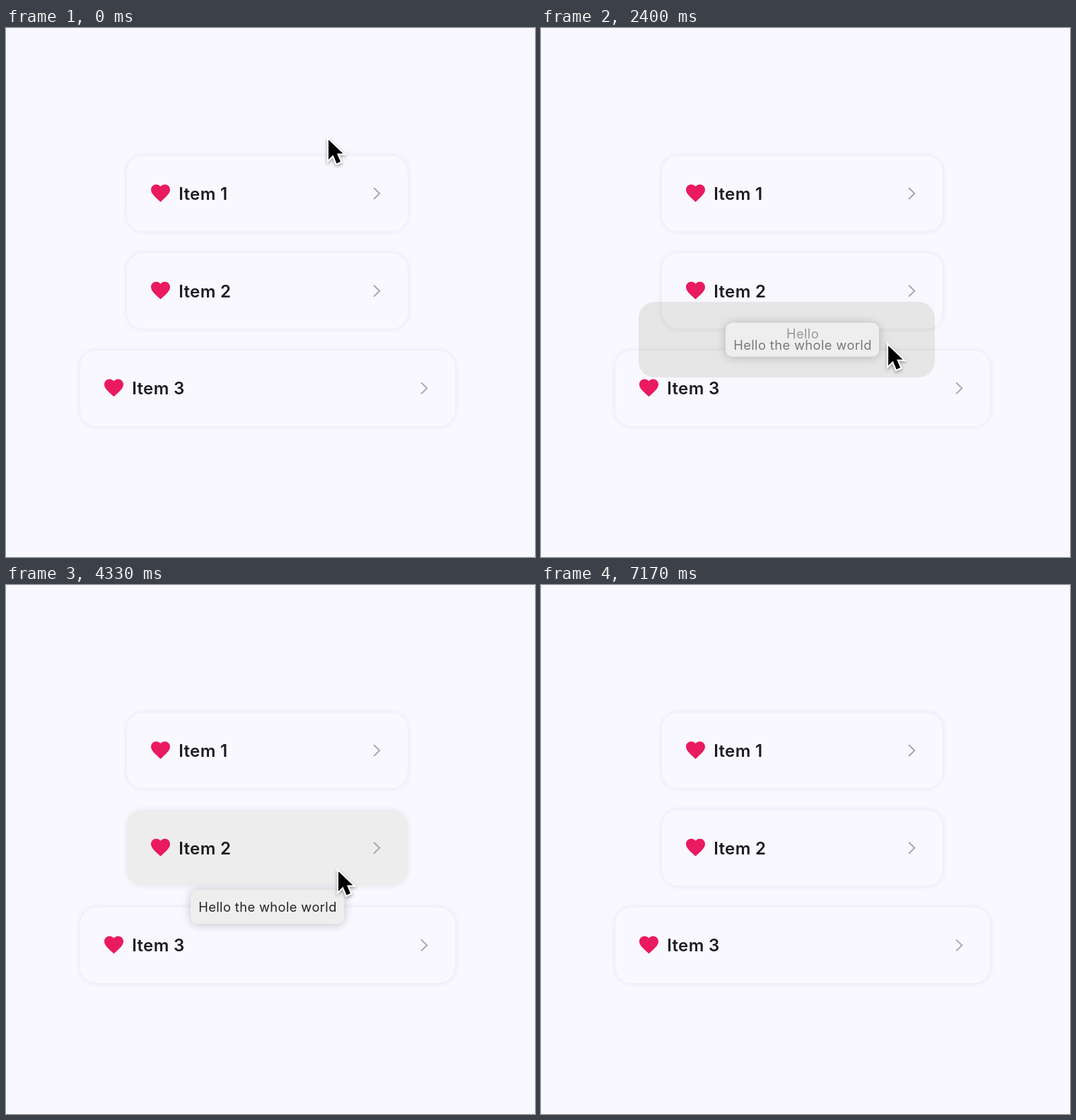
Animation of 748 by 748 pixels, one loop 7210 ms. Source, as an HTML page:

```html
<!DOCTYPE html>
<html lang="en">
<head>
<meta charset="utf-8">
<title>Hover list</title>
<style>
  html, body { margin: 0; width: 100%; height: 100%; overflow: hidden; background: #f8f8fe; }
  body { position: relative; font-family: Inter, "Open Sans", sans-serif; }
  .card, #glow, #tip, #cursor { position: absolute; left: 0; top: 0; }
  .card, #glow { height: 106.5px; border-radius: 23px; }
  .card { box-shadow: 0 0 9px rgba(0, 0, 0, .085); }
  svg { display: block; overflow: visible; }
  .card text { font-size: 24px; font-weight: 600; letter-spacing: .35px; fill: #1d1d20; }
  #tip {
    left: 261px; width: 217px; height: 48px; border-radius: 10px;
    background: #eeeeee; box-shadow: 0 1px 14px rgba(0, 0, 0, .22);
  }
  #tip span {
    position: absolute; inset: 0 0 0 1px; line-height: 48px; text-align: center;
    font-size: 18.3px; letter-spacing: .4px; color: #252527; white-space: nowrap;
  }
  #cursor { filter: drop-shadow(0 2px 2px rgba(0, 0, 0, .35)); }
</style>
</head>
<body>
<div id="glow"></div>
<div id="cards"></div>
<div id="tip"></div>
<svg id="cursor" width="28" height="42">
  <path d="M2 4V32L8.5 25.5L13.5 37.5L19 35L14 23.5H22.5Z"
        stroke="#fff" stroke-width="4.4" paint-order="stroke"/>
</svg>
<script>
const LOOP = 7210, MOVE = 465;
const LEAD = 110; // the drawn pointer trails the real one by this many ms
const CARD_HEIGHT = 106.5;

const items = ["", "Hello the whole world", "Hello"].map((tip, i) => {
  const wide = i === 2, y = 180.5 + 137.7 * i;
  return {
    tip, y,
    x: wide ? 105 : 171,
    w: wide ? 530 : 397,
    tipY: wide ? y - 51 : y + 113,
  };
});

// Pointer stops: [ms, x, y]
const stops = [
  [0, 454, 154], [1400, 458, 397], [2060, 491, 542], [2640, 488, 390],
  [3118, 488, 213], [3950, 470, 398], [4330, 468, 401], [4860, 487, 532],
  [5420, 485, 396], [6020, 476, 212], [6530, 474, 214], [7150, 478, 790],
];

const $ = id => document.getElementById(id);
const mix = (a, b, k) => a + (b - a) * k;
const clamp = v => Math.min(1, Math.max(0, v));

// cubic-bezier(.25, .1, .25, 1)
function ease(v) {
  const curve = (a, b, u) => 3 * a * u * (1 - u) ** 2 + 3 * b * u * u * (1 - u) + u ** 3;
  let lo = 0, hi = 1;
  for (let i = 0; i < 24; i++) {
    const mid = (lo + hi) / 2;
    if (curve(.25, .25, mid) < v) lo = mid; else hi = mid;
  }
  return curve(.1, 1, lo);
}

function pointerAt(t) {
  let i = 0;
  while (i < stops.length - 2 && stops[i + 1][0] <= t) i++;
  const [t0, x0, y0] = stops[i], [t1, x1, y1] = stops[i + 1];
  const u = (1 - Math.cos(Math.PI * clamp((t - t0) / (t1 - t0)))) / 2;
  return [mix(x0, x1, u), mix(y0, y1, u)];
}

// Hovers follow from the pointer: a card is entered when its top edge is crossed.
function findHovers() {
  const hovers = [];
  for (let t = 0; t < LOOP; t++) {
    const y = pointerAt(t + LEAD)[1];
    const to = items.filter(item => y >= item.y).length - 1;
    if (y > items[2].y + CARD_HEIGHT) return { hovers, leave: t };
    if (to >= 0 && to !== hovers.at(-1)?.to) hovers.push({ start: t, to });
  }
}
const { hovers, leave } = findHovers();

// Each hover starts from wherever the previous one had got to.
function hoverAt(t) {
  let box = items[0], state = { ...box, from: 0, to: 0, p: 1 };
  hovers.forEach(({ start, to }, i) => {
    if (t < start) return;
    const end = Math.min(t, hovers[i + 1]?.start ?? t);
    const p = i ? ease(clamp((end - start) / MOVE)) : 1, goal = items[to];
    box = {
      x: mix(box.x, goal.x, p),
      y: mix(box.y, goal.y, p),
      w: mix(box.w, goal.w, 1 - (1 - p) ** 2.6),
      tipY: mix(box.tipY, goal.tipY, p ** 1.13),
    };
    state = { ...box, from: i ? hovers[i - 1].to : to, to, p };
  });
  return state;
}

$("cards").innerHTML = items.map(({ x, y, w }, i) => `
  <div class="card" style="width:${w}px;transform:translate(${x}px,${y}px)">
    <svg width="${w}" height="106">
      <path transform="translate(31.3 36.6) scale(1.35)" fill="#e91a60"
        d="M12 21.35l-1.45-1.32C5.4 15.36 2 12.28 2 8.5 2 5.42 4.42 3 7.5 3c1.74 0 3.41.81 4.5 2.09C13.09 3.81 14.76 3 16.5 3 19.58 3 22 5.42 22 8.5c0 3.78-3.4 6.86-8.55 11.54L12 21.35z"/>
      <text x="73.2" y="62.4">Item ${i + 1}</text>
      <path d="M${w - 48} 45.5l8.2 8l-8.2 8" fill="none" stroke="#a9a9ae" stroke-width="2"/>
    </svg>
  </div>`).join("");

const labels = items.map(({ tip }) => {
  const label = document.createElement("span");
  label.textContent = tip;
  $("tip").append(label);
  return label;
});

function render(t) {
  const s = hoverAt(t);
  const shown = clamp((t - hovers[0].start) / 200) * clamp(1 - (t - leave) / 300);
  const shade = mix(236.5, 230, (4 * s.p * (1 - s.p)) ** 3);

  const glow = $("glow").style;
  glow.transform = `translate(${s.x}px,${s.y}px)`;
  glow.width = s.w + "px";
  glow.background = `rgb(${shade},${shade},${shade + 1})`;
  glow.opacity = shown;

  $("tip").style.transform = `translateY(${s.tipY}px)`;
  $("tip").style.opacity = shown;
  const fade = clamp(s.p * 1.16);
  labels.forEach((label, i) => {
    const incoming = i === s.to, outgoing = i === s.from;
    label.style.opacity = incoming ? fade : outgoing ? 1 - fade : 0;
    label.style.transform = `translateY(${incoming ? 16 * (1 - fade) : -16 * fade}px)`;
  });

  const [x, y] = pointerAt(t);
  $("cursor").style.transform = `translate(${x}px,${y}px)`;
}

const begin = performance.now();
function tick() {
  render((performance.now() - begin) % LOOP);
  requestAnimationFrame(tick);
}
tick();
</script>
</body>
</html>
```
